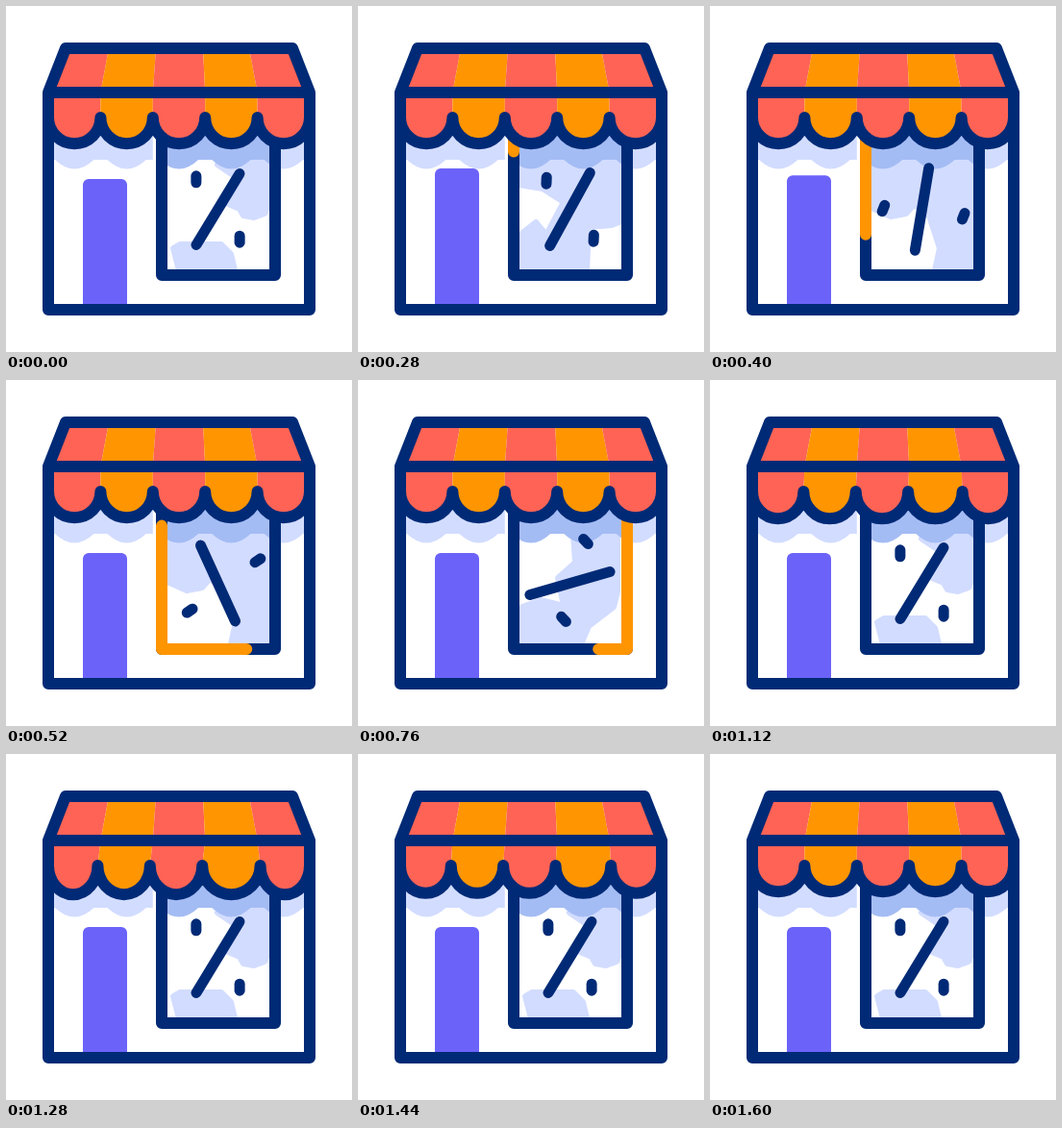
An HTML page that plays this animation: 360 px wide and 360 px high, repeating every 2000 ms.

```html
<!DOCTYPE html>
<html lang="en">
<head>
<meta charset="utf-8">
<title>Shop</title>
<style>
  html, body { margin: 0; height: 100%; overflow: hidden; background: #fff; }
  svg { display: block; width: 100vw; height: 100vh; }
  .line { fill: none; stroke: #002a76; stroke-width: 12; stroke-linecap: round; stroke-linejoin: round; }
  .sign { stroke-width: 11; }
  .pale { fill: #d2dcff; }
</style>
</head>
<body>
<svg viewBox="0 0 360 360">
  <defs>
    <clipPath id="pane"><path d="M162 120H280V280H162Z"/></clipPath>
  </defs>
  <path id="wallShade" class="pale"/>
  <rect id="door" x="80" width="46" height="150" rx="6" fill="#6b63f9"/>
  <g clip-path="url(#pane)">
    <path fill="#fff" d="M152 120H290V290H152Z"/>
    <path id="shine" class="pale" stroke="#d2dcff" stroke-width="6" stroke-linejoin="round"/>
    <path id="paneShade" fill="#a4bcf4"/>
  </g>
  <path class="line" d="M162 130V280H280V130"/>
  <path id="runner" class="line" style="stroke:#ff9500" d="M162 138V280H280V138"/>
  <path id="slash" class="line sign" d="M198 248.500L243 174.500"/>
  <path id="dotA" class="line sign" d="M0-3.500V3.500"/>
  <path id="dotB" class="line sign" d="M0-3.500V3.500"/>
  <g id="stripes"></g>
  <path id="scallops" class="line"/>
  <path class="line" d="M44 90H316V316H44ZL62 44H298L316 90"/>
</svg>
<script>
const $ = id => document.getElementById(id);
const clamp = x => Math.min(1, Math.max(0, x));
const ease = x => (1 - Math.cos(Math.PI * clamp(x))) / 2;
const bump = (t, from, to) => Math.sin(Math.PI * clamp((t - from) / (to - from))) ** 2;

const CENTER = [220.5, 211.5];
const EDGES = [44, 98.4, 152.8, 207.2, 261.6, 316];
const ROOF = [62, 107, 156, 205, 253, 298];
const SWAY = [0, -3, -3, -3, 3, 0];
const LENGTH = 402;

const REST = 'M274 160V204L269 216L258 220L247 218L243 211L231 206L232 194L242 180L220 165ZM174 252L181 248H224L234 258L238 275H180Z';
const SHINES = [
  [160, REST],
  [400, 'M168 160H274V224L264 228L240 230L238 275H171V236L185 225L196 238L214 204L192 190L168 186Z'],
  [640, 'M168 160H274V275H234L239 252L228 218L212 207L204 216L188 219L168 210Z'],
  [860, 'M224 160H270V220L266 236L240 256L232 275H171V236L190 229L214 235L208 206L226 190Z'],
  [1100, 'M274 160L269 212L262 228L240 234L232 248L236 270H182L174 256L198 248L214 222L232 210L242 172Z'],
  [2000, REST]
];

// Cubic interpolation through [time, angle, radius] poses
function pose(keys, t) {
  t = Math.min(Math.max(t, keys[0][0]), keys.at(-1)[0]);
  const i = Math.max(1, keys.findIndex(k => k[0] >= t));
  const a = keys[i - 1], b = keys[i];
  const before = keys[i - 2] || a, after = keys[i + 1] || b;
  const span = b[0] - a[0], u = (t - a[0]) / span;
  return [1, 2].map(n => {
    const m = (b[n] - before[n]) / (b[0] - before[0]) * span * (before !== a);
    const k = (after[n] - a[n]) / (after[0] - a[0]) * span * (after !== b);
    const d = b[n] - a[n];
    return a[n] + u * (m + u * (3 * d - 2 * m - k + u * (m + k - 2 * d)));
  });
}
const ORBIT_A = [[220, -126, 38.5], [280, -129, 38.5], [520, -224, 41], [760, -260, 38], [960, -304, 38.5], [1020, -306, 38.5]];
const ORBIT_B = [[220, 54, 38.5], [280, 51, 39], [520, -29.5, 47.7], [760, -69, 46.5], [960, -124, 38.5], [1020, -126, 38.5]];

function placeDot(id, keys, t, spin) {
  const [angle, r] = pose(keys, t), a = angle * Math.PI / 180;
  const x = CENTER[0] + r * Math.cos(a), y = CENTER[1] + r * Math.sin(a);
  $(id).setAttribute('transform', `translate(${x} ${y}) rotate(${spin})`);
}

// Shadow cast by the awning between two x positions
const shade = (from, to) => EDGES.slice(from, to).map((x, i) => {
  const right = EDGES[from + i + 1];
  return `M${x} 130H${right}V160H${right - 7}Q${(x + right) / 2} 179 ${x + 7} 160H${x}Z`;
}).join('');
$('wallShade').setAttribute('d', shade(0, 2) + shade(4, 5));
$('paneShade').setAttribute('d', shade(2, 5));

const stripes = EDGES.slice(1).map((_, i) => {
  const path = document.createElementNS('http://www.w3.org/2000/svg', 'path');
  path.setAttribute('fill', i % 2 ? '#ff9500' : '#ff6355');
  return $('stripes').appendChild(path);
});

function drawAwning(amount) {
  const xs = EDGES.map((x, i) => x + SWAY[i] * amount);
  const ry = 27.2 + 3 * amount;
  const arc = (from, to) => `A${Math.abs(to - from) / 2} ${ry} 0 0 0 ${to} 116`;
  stripes.forEach((path, i) => path.setAttribute('d',
    `M${ROOF[i + 1]} 44H${ROOF[i]}L${EDGES[i]} 90L${xs[i]} 116${arc(xs[i], xs[i + 1])}L${EDGES[i + 1]} 90Z`));
  $('scallops').setAttribute('d', 'M44 116' + xs.slice(1).map((x, i) => arc(xs[i], x)).join(''));
}

function draw(t) {
  const turn = 180 * ease((t - 220) / 800);
  $('slash').setAttribute('transform', `rotate(${-turn} ${CENTER})`);
  placeDot('dotA', ORBIT_A, t, turn);
  placeDot('dotB', ORBIT_B, t, turn);

  const head = LENGTH * ease((t - 215) / 560);
  const tail = LENGTH * ease((t - 455) / 560);
  const runner = $('runner');
  runner.style.display = head - tail > 0.1 ? '' : 'none';
  runner.setAttribute('stroke-dasharray', `0 ${tail} ${head - tail} 999`);
  // A leading zero dash would leave a round cap, so shift the pattern instead
  runner.setAttribute('stroke-dasharray', `${head - tail} 999`);
  runner.setAttribute('stroke-dashoffset', -tail);

  const top = 180 - 11 * bump(t, 80, 480);
  $('door').setAttribute('y', top);
  $('door').setAttribute('height', 316 - top);
  $('shine').setAttribute('d', SHINES.find(s => t < s[0])[1]);
  drawAwning(bump(t, 1000, 1600));
}

const start = performance.now();
function frame() {
  draw((performance.now() - start) % 2000);
  requestAnimationFrame(frame);
}
frame();
</script>
</body>
</html>
```
